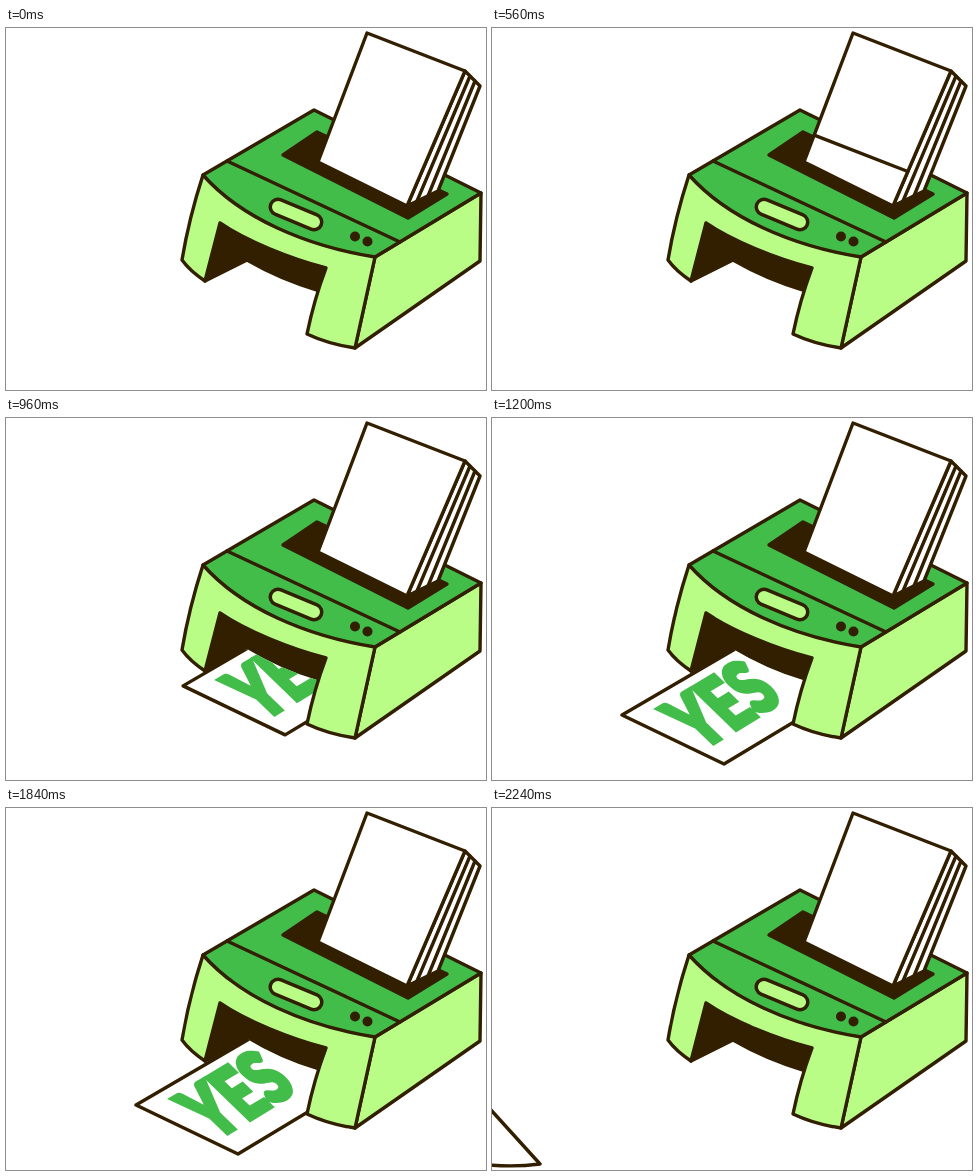
Write an HTML page that moves like this. It is 480 px wide and 362 px high and loops after 2.32 s.

```html
<!DOCTYPE html>
<html lang="en">
<head>
<meta charset="utf-8">
<title>Printer</title>
<style>
  html, body { margin: 0; height: 100%; overflow: hidden; background: #fff; }
  svg { display: block; width: 100vw; height: 100vh; }
  .ink { stroke: #321f00; stroke-width: 3.4; stroke-linejoin: round; stroke-linecap: round; }
  .dark { fill: #321f00; }
  .green { fill: #42bd4a; }
  .light { fill: #b9fd87; }
  .white { fill: #fff; }
  text { font: 900 100px Lato, "Open Sans", sans-serif; letter-spacing: -2px;
         fill: #42bd4a; stroke: #42bd4a; stroke-width: 5; }
</style>
</head>
<body>
<svg viewBox="0 0 480 362">
  <clipPath id="floor">
    <path d="M-300 200H199V240L241 231Q274 251 311 262L340 270V400H-300Z"/>
  </clipPath>

  <path class="dark ink" d="M214 195C240 213 285 231 320 240L311 262Q274 251 241 232L199 253Z"/>
  <g clip-path="url(#floor)">
    <g id="page">
      <path id="sheet" class="white ink"/>
      <text id="word">YES</text>
    </g>
  </g>

  <g class="ink">
    <path class="light" d="M369 229L475 165 474 233 349 320Z"/>
    <path class="light" d="M197 147Q183 190 176 232Q184 243 199 253L214 195C240 213 285 231 320 240Q308 272 301 306Q322 316 349 320L369 229Z"/>
    <path class="green" d="M308 82L475 165 369 229C300 218 235 190 197 147Z"/>
    <path d="M221 133L394 214"/>
    <path class="dark" d="M277 127L311 104 441 166 402 190Z"/>
    <path class="white" d="M459 43L474 58 432 163 401 178Z"/>
    <path d="M464 48L411 173M469 53L422 168"/>
    <path class="white" d="M361 5L459 43 401 178 312 134Z"/>
    <path id="feed"/>
  </g>

  <g fill="none" stroke-linecap="round">
    <path d="M272 179L308 194" stroke="#321f00" stroke-width="19"/>
    <path id="button" d="M272 179L308 194" stroke-width="12"/>
  </g>
  <circle class="dark" cx="349" cy="208.500" r="5"/>
  <circle class="dark" cx="361.500" cy="213.500" r="5"/>
</svg>

<script>
const TICK = 80, LOOP = 2320;
const set = (id, name, value) => document.getElementById(id).setAttribute(name, value);
const clamp = x => Math.max(0, Math.min(1, x));
const mix = (a, b, f) => a.map((v, i) => v + (b[i] - v) * f);

// The page lies flat in the tray, then lifts off: left, top, right, bottom corner.
const tray = { corners: [130, 297, 262, 220, 365, 266, 232, 346], word: [.48, -.29, .6, .58, 209, 333] };
const air = { corners: [0, 290, 157, 278, 252, 328, 98, 355], word: [.59, -.11, .51, .6, 95, 350] };

// Two sides are straight; the other two sag by the same bend.
function sheetPath([lx, ly, tx, ty, rx, ry, bx, by], bend) {
  const sag = (x1, y1, x2, y2) =>
    `Q${(x1 + x2) / 2 + 12 * bend} ${(y1 + y2) / 2 + 20 * bend} ${x2} ${y2}`;
  return `M${lx} ${ly}${sag(lx, ly, tx, ty)}L${rx} ${ry}${sag(rx, ry, bx, by)}Z`;
}

function drawPage(t) {
  const inside = Math.max(0, 15 - t);   // ticks left until fully printed
  const lift = clamp((t - 24) / 2);
  const fly = clamp((t - 26) / 2);
  const dx = 15.7 * inside - 204 * fly, dy = 28 * fly - 9.7 * inside;
  set('page', 'visibility', t < 9 ? 'hidden' : 'visible');
  set('page', 'transform', `translate(${dx} ${dy}) rotate(${20 * fly} 252 328)`);
  set('sheet', 'd', sheetPath(mix(tray.corners, air.corners, lift), lift));
  set('word', 'transform', `matrix(${mix(tray.word, air.word, lift)})`);
}

// Upper edge of the front sheet sliding down into the printer.
function drawFeed(t) {
  const f = (t - 1) * .132;
  const from = mix([361, 5], [312, 134], f), to = mix([459, 43], [401, 178], f * .94);
  set('feed', 'd', t > 1 && t < 9 ? `M${from}L${to}` : '');
}

function frame(now) {
  const t = Math.floor(now % LOOP / TICK);
  drawFeed(t);
  drawPage(t);
  set('button', 'stroke', t === 20 || t === 22 ? '#fff' : '#b9fd87');
  requestAnimationFrame(frame);
}
frame(performance.now());
</script>
</body>
</html>
```
